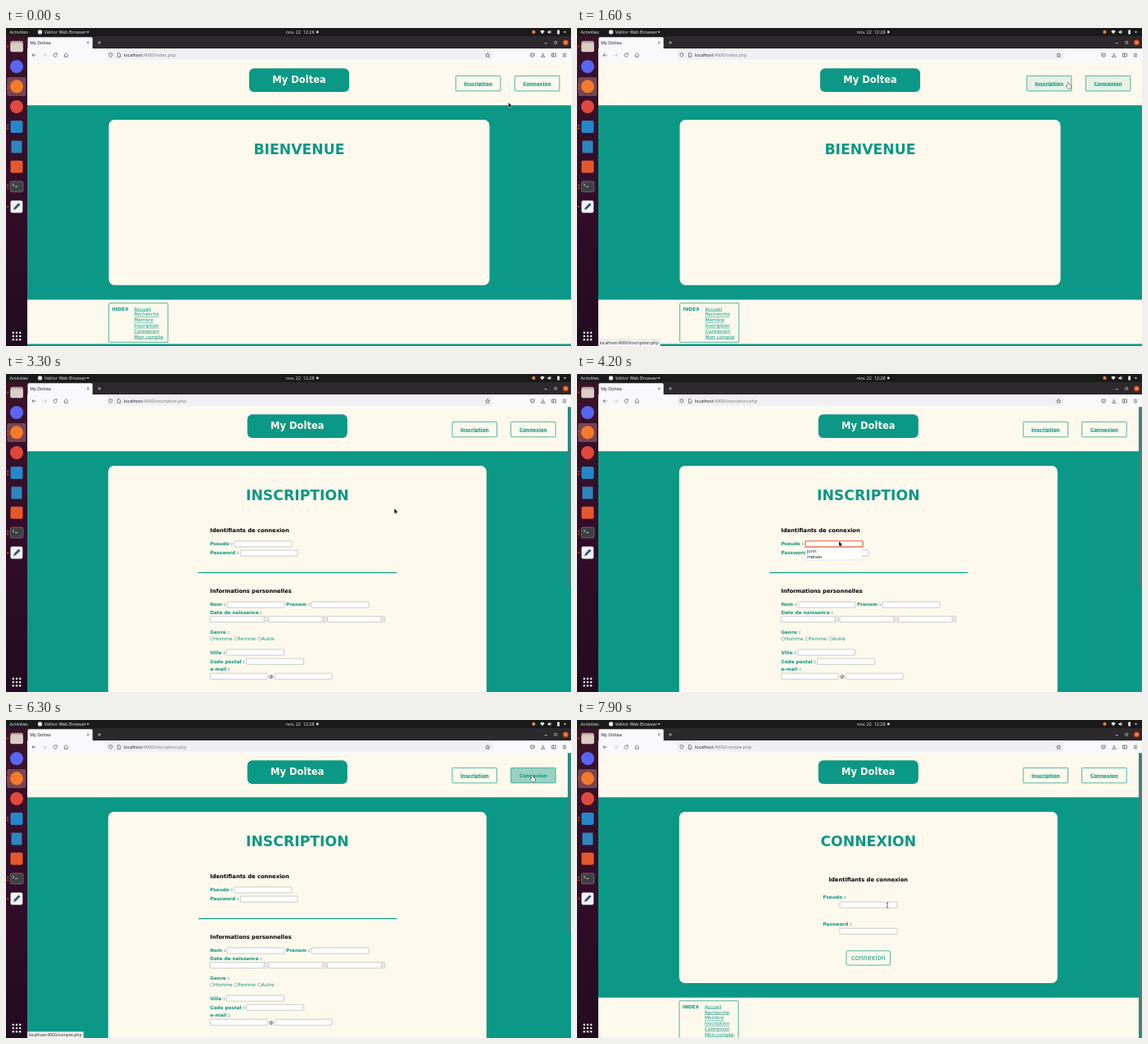
An HTML page with a canvas that plays this animation: 690 px wide and 388 px high, repeating every 8000 ms.

```html
<!DOCTYPE html>
<html lang="fr">
<head>
<meta charset="utf-8">
<title>My Doltea</title>
<style>
html, body { margin: 0; width: 100%; height: 100%; overflow: hidden; }
canvas { display: block; width: 690px; height: 388px; }
</style>
</head>
<body>
<canvas id="stage"></canvas>
<script>
const W = 690, H = 388, LOOP = 8000, STEP = 100;
const TEAL = '#0c9886', CREAM = '#fef9ed', INK = '#2e3436';
const UI = '"Open Sans", sans-serif', PAGE = '"DejaVu Sans", sans-serif';
const canvas = document.getElementById('stage');
const c = canvas.getContext('2d');
const dpr = window.devicePixelRatio || 1;
canvas.width = W * dpr;
canvas.height = H * dpr;

// ---------- drawing helpers ----------
function rect(x, y, w, h, fill, { radius = 0, stroke, line = 0.7 } = {}) {
  c.beginPath();
  c.roundRect(x, y, w, h, radius);
  if (fill) { c.fillStyle = fill; c.fill(); }
  if (stroke) { c.strokeStyle = stroke; c.lineWidth = line; c.stroke(); }
}
function disc(x, y, r, fill, stroke, line = 0.5) {
  c.beginPath();
  c.arc(x, y, r, 0, 7);
  if (fill) { c.fillStyle = fill; c.fill(); }
  if (stroke) { c.strokeStyle = stroke; c.lineWidth = line; c.stroke(); }
}
function path(d, x, y, { fill, stroke, line = 0.7 } = {}) {
  const shape = new Path2D(d);
  c.save();
  c.translate(x, y);
  c.lineJoin = 'round';
  if (stroke) { c.strokeStyle = stroke; c.lineWidth = line; c.stroke(shape); }
  if (fill) { c.fillStyle = fill; c.fill(shape); }
  c.restore();
}
function text(s, x, y, size, color, { font = PAGE, bold = false, center = false, underline = false } = {}) {
  c.font = `${bold ? 'bold ' : ''}${size}px ${font}`;
  c.fillStyle = color;
  const width = c.measureText(s).width;
  const left = center ? x - width / 2 : x;
  c.fillText(s, left, y);
  if (underline) c.fillRect(left, y + 0.7, width, 0.5);
  return left + width;
}
const ui = (s, x, y, color, size = 5.4) => text(s, x, y, size, color, { font: UI });
const label = (s, x, y) => text(s, x, y, 5.75, TEAL, { bold: true });
const heading = (s, x, y, center) => text(s, x, y, 6.73, '#000', { bold: true, center });

// ---------- timeline ----------
const LOAD = [2200, 6500], FOCUS = [4200, 6300];
const MOVES = [
  [700, 613.7, 91], [1100, 640, 70], [1350, 640, 68], [1600, 600, 66.5], [1800, 586.5, 65.5],
  [2600, 586.5, 65.5], [2850, 577, 80], [3000, 576, 80], [3300, 474.3, 164.2],
  [3500, 474.3, 164.2], [4000, 320, 204.2], [5400, 320, 204.2], [6000, 640, 72],
  [6200, 644, 69], [6300, 642.7, 67.5], [7100, 642.7, 67.5], [7900, 379, 226]
];
const smooth = u => u * u * (3 - 2 * u);
const within = (t, [from, to]) => t >= from && t < to;
const pageAt = t => t < LOAD[0] ? 0 : t < LOAD[1] ? 1 : 2;

function pointer(t) {
  const next = MOVES.findIndex(m => m[0] > t);
  if (next === 0) return MOVES[0].slice(1);
  if (next < 0) return MOVES.at(-1).slice(1);
  const [t0, x0, y0] = MOVES[next - 1], [t1, x1, y1] = MOVES[next];
  const u = smooth((t - t0) / (t1 - t0));
  return [x0 + (x1 - x0) * u, y0 + (y1 - y0) * u];
}

// ---------- page model ----------
const BUTTON = { y: 58.4, w: 54.6, h: 18.4 };
const LINKS = ['Inscription', 'Connexion'];
const URLS = ['index.php', 'inscription.php', 'compte.php'];
const TITLES = ['BIENVENUE', 'INSCRIPTION', 'CONNEXION'];
const INPUT_W = 70, INPUT_H = 7.1;
const INPUTS = [
  [],
  [[279, 203.8], [286.2, 215], [270, 277.9], [373, 277.9], [249.2, 295.7], [321, 295.7],
   [392.6, 295.7], [269.5, 336], [293.6, 347.2], [249.2, 365.2], [328.2, 365.2]],
  [[321, 222], [321, 254.2]]
];
const inside = (x, y, bx, by, w, h) => x >= bx && x <= bx + w && y >= by && y <= by + h;
const buttonX = (page, i) => (page ? 545 : 549.3) + i * (page ? 71.6 : 72);

function hovered(t) {
  const [x, y] = pointer(t), page = pageAt(t);
  return LINKS.findIndex((_, i) => inside(x, y, buttonX(page, i), BUTTON.y, BUTTON.w, BUTTON.h));
}
// Colour transition: share of the last 200 ms spent over the link.
function hoverAmount(t, i) {
  let hits = 0;
  for (let k = 0; k < 10; k++) hits += hovered(t - k * 20) === i;
  return smooth(hits / 10);
}

// ---------- page ----------
function drawIndex(dx, dy) {
  rect(125.6 + dx, 335.6 + dy, 72.2, 47.8, null, { stroke: TEAL, radius: 0.7 });
  label('INDEX', 129.6 + dx, 344.6 + dy);
  ['Accueil', 'Recherche', 'Membre', 'Inscription', 'Connexion', 'Mon compte'].forEach((s, i) =>
    text(s, 156.6 + dx, 344.6 + dy + i * 6.83, 5.75, TEAL, { underline: true }));
}

function drawSignup() {
  heading('Identifiants de connexion', 249.2, 193.2);
  label('Pseudo :', 249.2, 209.2);
  label('Password :', 249.2, 220.4);
  rect(235, 241.8, 242, 1.2, TEAL);
  heading('Informations personnelles', 249.2, 267.3);
  label('Nom :', 249.2, 283.3);
  label('Prenom :', 342, 283.3);
  label('Date de naissance :', 249.2, 292.5);
  label('Genre :', 249.2, 317.2);
  [['Homme', 251.5], ['Femme', 281.2], ['Autre', 309.6]].forEach(([s, x]) => {
    disc(x, 323, 2, '#fff', '#777');
    text(s, x + 2.4, 325, 5.75, TEAL);
  });
  label('Ville :', 249.2, 341.5);
  label('Code postal :', 249.2, 352.7);
  label('e-mail :', 249.2, 361.8);
  text('@', 320.9, 371, 5.75, INK);
}

function drawLogin() {
  heading('Identifiants de connexion', 355.8, 197, true);
  label('Pseudo :', 300.3, 218.4);
  label('Password :', 300.3, 250.8);
  rect(329, 281.7, 53.6, 17.4, null, { stroke: TEAL, radius: 1.5 });
  text('connexion', 355.8, 293.3, 8.05, TEAL, { center: true });
}

function drawInputs(page) {
  INPUTS[page].forEach(([x, y]) => {
    rect(x, y, INPUT_W, INPUT_H, '#fff', { stroke: '#9a9996', line: 0.5, radius: 0.6 });
    if (y !== 295.7) return;
    rect(x + 64, y + 0.5, 5.5, 6.1, '#eee');
    path('M-1 -.8L0 -2L1 -.8M-1 .8L0 2L1 .8', x + 66.7, y + 3.5, { stroke: '#888', line: 0.5 });
  });
}

function drawSuggestions() {
  rect(279, 203.8, INPUT_W, INPUT_H, '#fff', { stroke: '#e9603f', line: 1.1, radius: 0.8 });
  rect(278.7, 211.9, 70, 15, '#fff', { stroke: '#ccc', line: 0.4 });
  ui('jorin', 281, 218, '#111');
  ui('melvan', 281, 225, '#111');
}

function drawPage(t) {
  const page = pageAt(t);
  const middle = page ? 355.8 : 358;
  const mainEnd = [331.6, H, 338.7][page];
  rect(26, 40, 664, 348, TEAL);
  rect(26, 40, page ? 660 : 664, 54.2, CREAM);
  rect(middle - 61.1, 49.3, 122.2, 28.6, TEAL, { radius: 6 });
  text('My Doltea', middle, 67, 11.5, CREAM, { bold: true, center: true });

  LINKS.forEach((s, i) => {
    const x = buttonX(page, i), amount = hoverAmount(t, i);
    rect(x, BUTTON.y, BUTTON.w, BUTTON.h, `rgba(12,152,134,${0.42 * amount})`, { stroke: TEAL, radius: 0.8 });
    text(s, x + BUTTON.w / 2, 69.8, 5.75, TEAL, { bold: true, center: true, underline: amount < 0.5 });
  });

  const half = page ? 231 : 232.5;
  rect(middle - half, 112, half * 2, [201.8, 300, 209][page], CREAM, { radius: 7 });
  text(TITLES[page], middle, 153.8, 17.25, TEAL, { bold: true, center: true });
  if (page === 1) drawSignup();
  if (page === 2) drawLogin();
  drawInputs(page);
  if (within(t, FOCUS)) drawSuggestions();

  if (page !== 1) {
    rect(26, mainEnd, page ? 660 : 664, 54, CREAM);
    drawIndex(page ? -0.7 : 0, page ? 7.1 : 0);
  }
  if (page) {
    rect(686, 40, 4, 348, TEAL);
    rect(686.6, 40.6, 3, page === 1 ? 219.5 : 340, '#4b7f7b', { radius: 1.5 });
  }
}

function drawStatus(t) {
  const link = hovered(t);
  if (link < 0 || within(t, [2200, 2700]) || within(t, [6500, 7200])) return;
  const s = 'localhost:4000/' + URLS[link + 1];
  c.font = `5.1px ${UI}`;
  rect(25.7, 380.2, c.measureText(s).width + 4, 9, '#f4f4f6', { stroke: '#bbb', line: 0.4, radius: 1 });
  ui(s, 27.6, 386.2, '#222', 5.1);
}

// ---------- desktop ----------
function drawPanel() {
  rect(0, 0, W, 10, '#1b1a1b');
  ui('Activities', 4.6, 7, '#eee');
  disc(41.5, 4.9, 2.6, '#eee');
  ui('Velitor Web Browser', 46.8, 7, '#eee');
  path('M-1.7 -.8H1.7L0 1.3Z', 100, 5, { fill: '#ddd' });
  ui('nov. 22  12:28', 342, 7, '#eee');
  disc(380.3, 4.9, 1.4, '#eee');
  disc(644.4, 4.9, 2.1, '#e8803c');
  path('M-2.7 -1Q0 -3.2 2.7 -1L0 2.3Z', 655, 4.9, { fill: '#eee' });
  path('M-2.4 -1H-1L.6 -2.4V2.4L-1 1H-2.4Z', 664, 4.9, { fill: '#eee' });
  path('M1.4 -1.5Q2.8 0 1.4 1.5', 664, 4.9, { stroke: '#eee', line: 0.5 });
  rect(673.2, 2.4, 2.8, 5, '#eee', { radius: 0.5 });
  path('M-1.7 -.8H1.7L0 1.3Z', 682.5, 5, { fill: '#ddd' });
}

function drawDock() {
  const shade = c.createLinearGradient(0, 10, 0, H);
  shade.addColorStop(0, '#3a1228');
  shade.addColorStop(0.5, '#320d29');
  shade.addColorStop(1, '#210b20');
  rect(0, 10, 26, 378, shade);
  rect(1.3, 60, 23, 23, '#754554', { radius: 2 });

  rect(5.4, 15.8, 15.4, 13, '#b9a99b', { radius: 2 });
  rect(5.4, 18.3, 15.4, 11, '#d8cec3', { radius: 2 });
  disc(13, 47, 8, '#5865f2');
  disc(13, 71.3, 8, '#f57b29');
  disc(13, 96, 8, '#e0483b');
  rect(5.5, 113, 15, 15, '#2487cb', { radius: 2 });
  rect(6.5, 137.5, 13, 15, '#2d86bf', { radius: 1 });
  rect(5.5, 161.8, 15, 15, '#e5582b', { radius: 2 });
  rect(5.3, 187, 15.6, 13, '#3d4043', { radius: 2, stroke: '#8b8b8b', line: 0.6 });
  path('M-5 -3L-3 -1.5L-5 0M-2 .5H1.2', 13, 193, { stroke: '#eee' });
  rect(5.5, 210.5, 14.8, 15, '#f2f3f5', { radius: 2 });
  path('M-4 4L-3 1L2.3 -4.5L4.5 -2.5L-1 3Z', 13, 218, { fill: '#35557d' });

  [22.5, 70, 73.5, 119, 122.5, 192, 195.5, 218].forEach(y => disc(2.2, y, 0.95, '#e95420'));
  for (let i = 0; i < 9; i++) disc(8.8 + (i % 3) * 4.2, 371.8 + Math.floor(i / 3) * 4.2, 1.25, '#f0f0f0');
}

function drawTabBurst(t) {
  const start = t < 6500 ? 2200 : 6550;
  const age = t - start;
  if (age <= 0 || age > 375) return;
  c.save();
  c.beginPath();
  c.rect(26.5, 11, 79, 14);
  c.clip();
  disc(33, 18, age * 0.19, `rgba(70,145,225,${0.5 * (1 - age / 375)})`);
  c.restore();
}

function drawBrowser(t) {
  rect(26, 10, 664, 15.2, '#2b292b');
  rect(26.5, 11.2, 79.2, 14, '#f9f9fb', { radius: [1.5, 1.5, 0, 0] });
  drawTabBurst(t);
  ui('My Doltea', 29.2, 19.7, '#15141a');
  path('M-1.3 -1.3L1.3 1.3M1.3 -1.3L-1.3 1.3', 100.2, 17.8, { stroke: '#333', line: 0.6 });
  path('M-2 0H2M0 -2V2', 114, 17.8, { stroke: '#eee', line: 0.6 });
  path('M-1.6 1H1.6', 659.3, 17.6, { stroke: '#ddd' });
  rect(669.8, 16.3, 2.8, 2.8, null, { stroke: '#ddd', line: 0.6 });
  disc(683.5, 17.7, 3.3, '#e95420');
  path('M-1.1 -1.1L1.1 1.1M1.1 -1.1L-1.1 1.1', 683.5, 17.7, { stroke: '#fff', line: 0.6 });

  rect(26, 25, 664, 15.2, '#f9f9fb');
  rect(122.5, 27, 472, 11.6, '#f0f0f4', { radius: 1.5 });
  const icon = (d, x, color = '#444') => path(d, x, 33, { stroke: color, line: 0.65 });
  icon('M2.5 0H-2.3M-.2 -2L-2.3 0L-.2 2', 34.2);
  icon('M-2.5 0H2.3M.2 -2L2.3 0L.2 2', 47.2, '#bbb');
  icon('M1.7 -1.4A2.2 2.2 0 1 0 2.2 .3M2 -2.5V-1H.5', 60.2);
  icon('M-2.4 0L0 -2.3L2.4 0M-1.8 -.3V2.3H1.8V-.3', 73.2);
  icon('M0 -2.5L2 -1.8Q2 1.4 0 2.5Q-2 1.4 -2 -1.8Z', 127.8);
  icon('M-1.6 -2.4H.5L1.7 -1.2V2.4H-1.6Z', 138);
  icon('M0 -2.5L.8 -.8L2.5 -.6L1.2 .6L1.6 2.4L0 1.5L-1.6 2.4L-1.2 .6L-2.5 -.6L-.8 -.8Z', 588.2);
  icon('M-2.3 -2H2.3V0A2.3 2.3 0 0 1 -2.3 0ZM-1.1 -.4L0 .7L1.1 -.4', 643);
  icon('M0 -2.5V.8M-1.4 -.5L0 .9L1.4 -.5M-2.2 1V2.3H2.2V1', 655.8);
  icon('M-2.4 -2H2.4V2H-2.4ZM-.5 -2V2', 669);
  icon('M-2.2 -1.8H2.2M-2.2 0H2.2M-2.2 1.8H2.2', 682);
  const end = ui('localhost', 144, 35, '#15141a');
  ui(':4000/' + URLS[pageAt(t)], end, 35, '#777');
}

function drawPointer(t) {
  const [x, y] = pointer(t);
  const overInput = !within(t, FOCUS) &&
    INPUTS[pageAt(t)].some(([bx, by]) => inside(x, y, bx, by, INPUT_W, INPUT_H));
  if (hovered(t) >= 0) {
    path('M-.7 .3Q0 -.6 .7 .3V2.7L3 3.3Q3.8 3.6 3.6 4.6L3 7.3H-.5L-2.4 4.7Q-2.3 3.7 -.7 4.6Z', x, y,
      { fill: '#fff', stroke: '#222', line: 1 });
  } else if (overInput) {
    const beam = 'M-1.3 -3H1.3M0 -3V3M-1.3 3H1.3';
    path(beam, x, y, { stroke: '#fff', line: 1.3 });
    path(beam, x, y, { stroke: '#111', line: 0.6 });
  } else {
    path('M0 0V5.7L1.3 4.5L2.2 6.5L3.2 6L2.3 4.1H4Z', x, y, { fill: '#111', stroke: '#fff', line: 0.8 });
  }
}

function frame(now) {
  const t = Math.floor((now % LOOP) / STEP) * STEP;
  c.setTransform(dpr, 0, 0, dpr, 0, 0);
  drawPage(t);
  drawStatus(t);
  drawBrowser(t);
  drawPanel();
  drawDock();
  drawPointer(t);
}

const begin = performance.now();
(function tick() {
  frame(performance.now() - begin);
  requestAnimationFrame(tick);
})();
</script>
</body>
</html>
```
